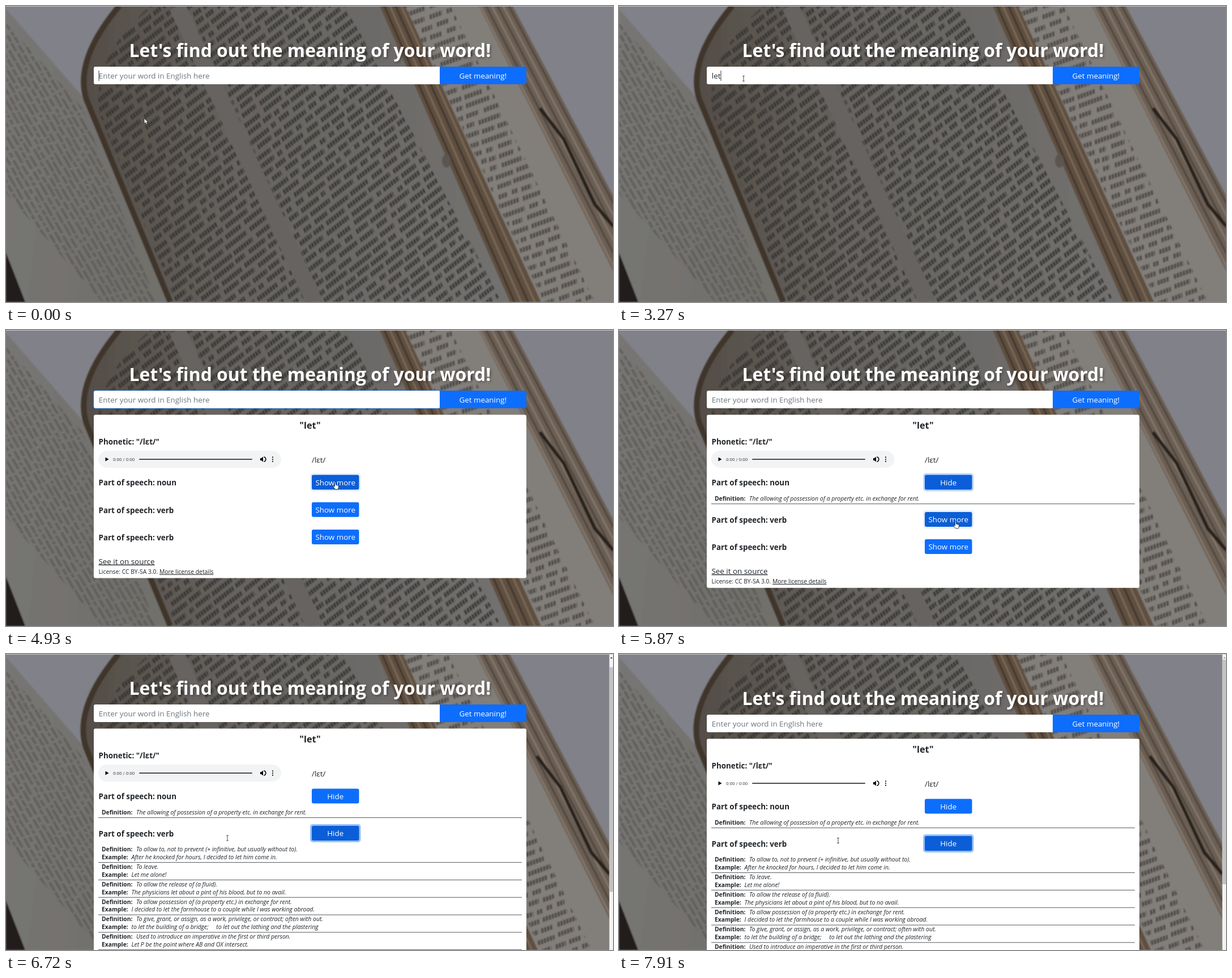
Write an HTML page that moves like this. It is 1072 px wide and 522 px high and loops after 8000 ms.

```html
<!DOCTYPE html>
<html lang="en">
<head>
<meta charset="utf-8">
<title>Word finder</title>
<style>
  html, body { margin: 0; width: 100%; height: 100%; overflow: hidden; background: #6b6865; }
  svg { display: block; width: 1072px; height: 522px; }
  text { font-family: "Open Sans", "Noto Sans", sans-serif; font-size: 13.4px; fill: #212529; white-space: pre; }
  .bold { font-weight: 700; }
  .word { font-size: 16.3px; }
  .small { font-size: 10.35px; }
  .label { font-size: 10.3px; font-weight: 700; }
  .quote { font-size: 10.5px; font-style: italic; }
  .mid { text-anchor: middle; }
  .white { fill: #fff; }
  .under { text-decoration: underline; }
  .title { font-size: 31.9px; text-shadow: 2px 2px 4px rgba(0, 0, 0, .3); }
  .hint { fill: #6c757d; }
  .time { font-family: Roboto, "Liberation Sans", sans-serif; font-size: 8px; fill: #444; }
</style>
</head>
<body>
<svg viewBox="0 0 1072 522" xmlns="http://www.w3.org/2000/svg">
  <g id="photo"></g>
  <g id="page"></g>
  <g id="bar"></g>
  <rect width="1072" height="1" fill="#c9c9cb"/>
  <g id="pointer"></g>
</svg>
<script>
const LOOP = 8000, WIDTH = 1072, HEIGHT = 522;
const BLUE = '#0d6efd', DARK_BLUE = '#0b5ed7';
const $ = id => document.getElementById(id);

const ramp = (t, from, length) => Math.min(1, Math.max(0, (t - from) / length));
const ease = k => k * k * (3 - 2 * k);
const mix = (a, b, k) => a + (b - a) * k;

const text = (x, y, content, cls = '') => `<text x="${x}" y="${y}" class="${cls}">${content}</text>`;
const rect = (x, y, w, h, fill, r = 0, extra = '') =>
  `<rect x="${x}" y="${y}" width="${w}" height="${h}" rx="${r}" fill="${fill}" ${extra}/>`;
const line = (d, stroke, width) => `<path d="${d}" stroke="${stroke}" stroke-width="${width}" fill="none"/>`;

/* ---------- blurred book behind the page ---------- */

let seed = 7;
const random = () => (seed = (seed * 16807) % 2147483647) / 2147483647;

// Outline of a slanted strip, from its span at the top to its span at the bottom.
const strip = (top0, top1, low0, low1) => `M${top0} 0H${top1}L${low1} ${HEIGHT}H${low0}Z`;
const fill = (d, color) => `<path d="${d}" fill="${color}"/>`;

// Slanted rows of word-like dashes inside an outline.
function print(id, outline, { x, y, angle, gap, ink, size }) {
  let d = '';
  for (let row = -460; row < 460; row += gap) {
    for (let at = -460; at < 460;) {
      const word = size * (1 + random() * 5);
      d += `M${at.toFixed(1)} ${(row + random() * 2).toFixed(1)}h${word.toFixed(1)}`;
      at += word + size * (.6 + random() * .7);
    }
  }
  return `<clipPath id="${id}"><path d="${outline}"/></clipPath>
    <g clip-path="url(#${id})"><path transform="translate(${x} ${y}) rotate(${angle}) skewX(-15)" d="${d}"
      stroke="${ink}" stroke-width="${size}" stroke-dasharray="${size * .5} ${size * .2}" fill="none"/></g>`;
}

function drawPhoto() {
  let edges = '';
  for (let i = 0; i < 6; i++) {
    edges += line(`M${838 + i * 10} 0L${1105 + i * 12} ${HEIGHT}`, i % 2 ? '#51443a' : '#85776a', 3);
    if (i < 4) edges += line(`M${668 + i * 10} 0L${898 + i * 12} ${HEIGHT}`, i % 2 ? '#7d6a58' : '#3f342b', 3);
  }
  $('photo').innerHTML = `
    <defs>
      <linearGradient id="left" x2="1" y2=".2"><stop offset="0" stop-color="#777674"/><stop offset="1" stop-color="#716f6b"/></linearGradient>
      <linearGradient id="main" x2="1"><stop offset="0" stop-color="#544d46"/><stop offset=".35" stop-color="#666360"/><stop offset="1" stop-color="#737270"/></linearGradient>
      <filter id="soft"><feGaussianBlur stdDeviation="1"/></filter>
    </defs>
    ${rect(0, 0, WIDTH, HEIGHT, '#818289')}
    <g filter="url(#soft)">
      ${fill('M0 5L140 165L290 522H0Z', 'url(#left)')}
      ${print('leftText', 'M0 30L135 180L265 522H170L0 330Z',
        { x: 100, y: 260, angle: 60, gap: 10, ink: '#5a5854', size: 4.5 })}
      ${fill('M0 435L34 522H0Z', '#211d1a')}
      ${fill('M200 0Q120 95 140 165L290 522H900L672 0Z', 'url(#main)')}
      ${print('mainText', 'M255 0Q150 90 165 190L300 522H875L600 0Z',
        { x: 520, y: 260, angle: -38, gap: 15, ink: '#363431', size: 8 })}
      ${line('M302 0L545 522', '#666461', 30)}
      ${line('M200 0Q120 95 142 165L290 522', '#40342b', 10)}
      ${fill(strip(660, 705, 890, 945), '#5f4f41')}
      ${fill(strip(705, 835, 945, 1110), '#827e79')}
      ${print('rightText', strip(705, 785, 950, 1040),
        { x: 890, y: 330, angle: -20, gap: 17, ink: '#4b4744', size: 8 })}
      ${fill(strip(835, 895, 1100, 1172), '#6b5f54')}
      ${edges}
      ${line('M943 180L985 235L1040 350L1072 388', '#26201c', 6)}
      <ellipse cx="778" cy="273" rx="8" ry="12" fill="#5c5450"/>
    </g>`;
}

/* ---------- timing of the visit ---------- */

const FOCUS = 70, FIRST_KEY = 1980, KEY_GAP = 90, SUBMIT = 3090, RESULT = 3510;
const NOUN_CLICK = 4900, VERB_CLICK = 5840, CLICK_TIME = 90;
const WORD = 'let', BLINK = 530;

/* ---------- search box ---------- */

function searchBox(t) {
  const keys = t < FIRST_KEY ? 0 : Math.min(WORD.length, 1 + Math.floor((t - FIRST_KEY) / KEY_GAP));
  const typed = t < RESULT ? keys : 0;
  const caretX = 163.5 + 5.3 * typed;
  // The caret starts its blink anew whenever the box gets focus or a key.
  const restart = t < FIRST_KEY ? -BLINK / 4 : t < RESULT ? FIRST_KEY + KEY_GAP * (keys - 1) : RESULT;
  const caret = t < NOUN_CLICK && Math.floor((t - restart) / BLINK) % 2 === 0;
  const ring = t < RESULT ? (t >= FOCUS) - ramp(t, SUBMIT, 150)
    : (t >= RESULT + 120) - ramp(t, NOUN_CLICK, 150);
  return rect(155, 107, 764, 31, BLUE, 3) + rect(155, 107, 611, 31, '#fff', 3) + rect(750, 107, 16, 31, '#fff') +
    text(842.3, 128, 'Get meaning!', 'mid white') +
    (ring > 0 ? rect(154, 106, 613, 33, 'none', 4, `stroke="${BLUE}" stroke-width="2" opacity="${(ring * .55).toFixed(2)}"`) : '') +
    (typed ? text(163.8, 128, WORD.slice(0, typed)) : text(163.8, 128, 'Enter your word in English here', 'hint')) +
    (caret ? rect(caretX, 114, 1, 18, '#333') : '');
}

/* ---------- dictionary card ---------- */

const NOUN = [['The allowing of possession of a property etc. in exchange for rent.']];
const VERB = [
  ['To allow to, not to prevent (+ infinitive, but usually without to).', 'After he knocked for hours, I decided to let him come in.'],
  ['To leave.', 'Let me alone!'],
  ['To allow the release of (a fluid).', 'The physicians let about a pint of his blood, but to no avail.'],
  ['To allow possession of (a property etc.) in exchange for rent.', 'I decided to let the farmhouse to a couple while I was working abroad.'],
  ['To give, grant, or assign, as a work, privilege, or contract; often with out.',
    'to let the building of a bridge;' + '\u00a0'.repeat(5) + 'to let out the lathing and the plastering'],
  ['Used to introduce an imperative in the first or third person.', 'Let P be the point where AB and OX intersect.'],
  ['To cause (+ bare infinitive).', "Can you let me know what time you'll be arriving?"]
];
const PARTS = [
  { name: 'noun', entries: NOUN, click: NOUN_CLICK, blur: VERB_CLICK },
  { name: 'verb', entries: VERB, click: VERB_CLICK, blur: LOOP },
  { name: 'verb', entries: [], click: LOOP, blur: LOOP }
];
const CARD_TOP = 149.5, FIRST_ROW = 255.5, ROW = 48.2;
const entryHeight = ([, example]) => example ? 30.8 : 17.2;

function entry(y, [definition, example]) {
  return text(169, y + 45.2, 'Definition:', 'label') + text(230, y + 45.2, definition, 'quote') +
    (example ? text(169, y + 59, 'Example:', 'label') + text(221.5, y + 59, example, 'quote') : '') +
    rect(163, y + 33.4 + entryHeight([definition, example]), 748, 1, '#56595c');
}

function toggle(y, open, dark, ring) {
  return (ring > 0 ? rect(537, y - 3, 89.5, 32, '#98c1fe', 5, `opacity="${ring.toFixed(2)}"`) : '') +
    rect(540, y, 83.5, 26, dark ? DARK_BLUE : BLUE, 3) +
    text(581.7, y + 18, open ? 'Hide' : 'Show more', 'mid white');
}

function speechParts(t, pointer) {
  let y = FIRST_ROW, out = '';
  for (const { name, entries, click, blur } of PARTS) {
    const open = t >= click + CLICK_TIME;
    const hover = pointer.x > 540 && pointer.x < 624 && pointer.y > y && pointer.y < y + 26;
    const ring = ramp(t, click, 120) - ramp(t, blur, 80);
    pointer.hand = pointer.hand || hover;
    out += text(163.5, y + 18.8, `Part of speech: ${name}`, 'bold') + toggle(y, open, hover || ring > 0, ring);
    if (open) for (const item of entries) {
      out += entry(y, item);
      y += entryHeight(item);
    }
    y += ROW;
  }
  return { out, end: y };
}

function player(showBody) {
  const dots = [-1, 0, 1].map(i => `<circle cx="471" cy="${228 + i * 3.7}" r="1.1"/>`).join('');
  return (showBody ? rect(163, 213, 323, 30, '#f1f3f4', 15) : '') +
    fill('M175.5 224.5L181.5 228L175.5 231.5Z', '#000') +
    text(189, 231, '0:00 / 0:00', 'time') + rect(235, 227, 200, 2, '#4c4c4c', 1) +
    fill('M449 226h2l3 -2.5v9l-3 -2.5h-2z', '#000') + line('M455.4 223.8a4.3 4.3 0 0 1 0 8.4', '#000', 1.6) + dots;
}

function card(t, pointer, showPlayer) {
  const { out, end } = speechParts(t, pointer);
  return rect(155, CARD_TOP, 764, end + 37.4 - CARD_TOP, '#fff', 3) +
    text(537, 173.5, `"${WORD}"`, 'bold word mid') +
    text(163.5, 202, 'Phonetic: "/lɛt/"', 'bold') + player(showPlayer) + text(540, 233.5, '/lɛt/') +
    out + text(163.5, end + 12.6, 'See it on source', 'under') +
    text(163.5, end + 29.6, 'License: CC BY-SA 3.0. <tspan class="under">More license details</tspan>', 'small');
}

/* ---------- scrolling and pointer ---------- */

const SCROLL_DOWN = 6720, SCROLL_REST = 6910, SCROLL_UP = 7650, SCROLL_END = 7910, SCROLL_MAX = 163;

// The wheel moves the page in hard jumps: a nudge, the end, then back up.
function scrollAt(t) {
  if (t < SCROLL_DOWN || t >= SCROLL_END) return 0;
  if (t < SCROLL_REST) return 18;
  return t < SCROLL_UP ? SCROLL_MAX : t < SCROLL_UP + 60 ? SCROLL_MAX - 8 : 30;
}

function drawBar(scroll) {
  return rect(1065.5, 0, 6.5, HEIGHT, '#f3f3f3') + rect(1066, 10 + scroll * .742, 6, 396, '#c3c3c3') +
    fill('M1067 8L1069.2 5L1071.4 8z', scroll ? '#505050' : '#a3a3a3');
}

const STOPS = [
  { from: 400, time: 450, x: 220, y: 128 },
  { from: 4430, time: 420, x: 582, y: 270 },
  { from: 5360, time: 440, x: 595, y: 339 },
  { from: 6430, time: 290, x: 391, y: 324.5 },
  { from: SCROLL_REST, time: 1, x: 387, y: 329 }
];

function pointerAt(t) {
  let x = 244, y = 198;
  for (const stop of STOPS) {
    const k = ease(ramp(t, stop.from, stop.time));
    x = mix(x, stop.x, k);
    y = mix(y, stop.y, k);
  }
  return { x, y, hand: false, hidden: t >= 260 && t < 400, arrow: t < RESULT && y > 138 };
}

const ARROW = 'M0 0V9.5L2.3 7.5L4 11L5.7 10.2L4.2 7H7z';
const HAND = 'M-1.5 -1a1 1 0 0 1 2 0V3l4 1Q6 4.500 5.500 7L4.500 11H-.5L-4 6.500Q-4 5 -1.5 6z';
const BEAM = 'M-1.8 -4.500H1.8M0 -4.500V4.500M-1.8 4.500H1.8';

function drawPointer({ x, y, hand, hidden, arrow }) {
  if (hidden) return '';
  return `<path transform="translate(${x.toFixed(1)} ${y.toFixed(1)})" d="${arrow ? ARROW : hand ? HAND : BEAM}"
    fill="#fff" stroke="#1a1a1a" stroke-width=".8"/>`;
}

/* ---------- loop ---------- */

const shown = {};
function put(id, markup) {
  if (shown[id] !== markup) $(id).innerHTML = shown[id] = markup;
}

function render(t) {
  const pointer = pointerAt(t), scroll = scrollAt(t);
  const scrollable = t >= VERB_CLICK + CLICK_TIME;
  put('page', text(537, 90, "Let's find out the meaning of your word!", 'title bold mid white') +
    searchBox(t) + (t >= RESULT ? card(t, pointer, t < SCROLL_END) : ''));
  $('page').setAttribute('transform', `translate(0 ${-scroll})`);
  $('photo').setAttribute('transform', `scale(${scrollable ? .994 : 1} 1)`);
  put('bar', scrollable ? drawBar(scroll) : '');
  put('pointer', drawPointer(pointer));
}

drawPhoto();
const start = performance.now();
function tick() {
  render((performance.now() - start) % LOOP);
  requestAnimationFrame(tick);
}
tick();
</script>
</body>
</html>
```
